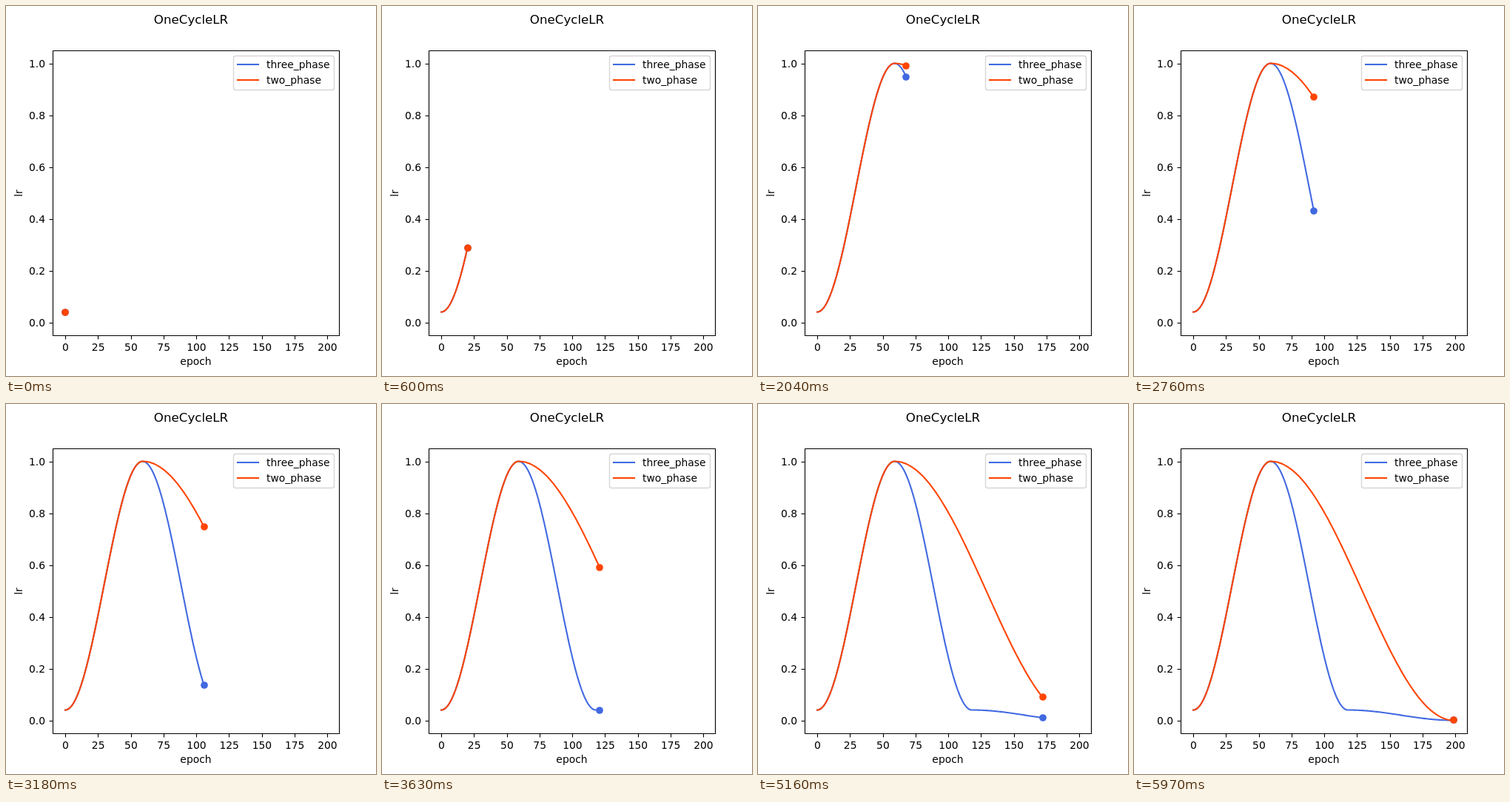
Recreate the animation shown at these times as an HTML page with a canvas. Size 500 px wide and 500 px high, loop 6000 ms.

```html
<!DOCTYPE html>
<html lang="en">
<head>
<meta charset="utf-8">
<title>Learning rate schedule</title>
<style>
  html, body { margin: 0; width: 100%; height: 100%; overflow: hidden; background: #fff; }
  canvas { display: block; }
</style>
</head>
<body>
<canvas id="chart" width="500" height="500"></canvas>
<script>
const ctx = document.getElementById('chart').getContext('2d');
const EPOCHS = 200, STEP_MS = 30;
const LEFT = 63.5, RIGHT = 450.5, TOP = 60.5, BOTTOM = 445.5;
const START_LR = 0.04, END_LR = 4e-6, PEAK = 59;
const FONT = '"DejaVu Sans", Verdana, sans-serif';

const px = epoch => 62.5 + (epoch + 9.95) * 387.5 / 218.9;
const py = lr => 427.5 - 350 * lr;
const snap = v => Math.floor(v + 0.5);

// Cosine annealing from lr a to lr b
const anneal = (a, b, p) => b + (a - b) * (1 + Math.cos(Math.PI * p)) / 2;

// Phases: [last epoch, lr reached there]
const schedule = phases => epoch => {
  let from = 0, lr = START_LR;
  for (const [to, target] of phases) {
    if (epoch <= to) return anneal(lr, target, (epoch - from) / (to - from));
    from = to;
    lr = target;
  }
  return lr;
};

const series = [
  { name: 'three_phase', color: '#4169e1', legendY: 79,
    lr: schedule([[PEAK, 1], [2 * PEAK, START_LR], [EPOCHS - 1, END_LR]]) },
  { name: 'two_phase', color: '#ff4500', legendY: 100,
    lr: schedule([[PEAK, 1], [EPOCHS - 1, END_LR]]) }
];

function text(str, x, y, align = 'center', size = 10) {
  ctx.font = `${size * 100 / 72}px ${FONT}`;
  ctx.textAlign = align;
  ctx.fillStyle = '#000';
  ctx.fillText(str, x, y);
}

function line(points, color, width) {
  ctx.beginPath();
  points.forEach(([x, y]) => ctx.lineTo(x, y));
  ctx.strokeStyle = color;
  ctx.lineWidth = width;
  ctx.stroke();
}

function drawAxes() {
  for (let epoch = 0; epoch <= 200; epoch += 25) {
    const x = snap(px(epoch)) + 0.5;
    ctx.lineCap = 'butt';
    line([[x, BOTTOM], [x, BOTTOM + 5]], '#000', 1.11);
    text(epoch, px(epoch) + 0.3, 466);
  }
  for (let i = 0; i <= 5; i++) {
    const y = snap(py(i / 5)) + 0.5;
    line([[LEFT, y], [LEFT - 5, y]], '#000', 1.11);
    text((i / 5).toFixed(1), 53, y + 4.5, 'right');
  }
  ctx.strokeRect(LEFT, TOP, RIGHT - LEFT, BOTTOM - TOP);
  text('OneCycleLR', 250, 24, 'center', 12);
  text('epoch', 256.5, 485);
  ctx.save();
  ctx.translate(22, 253);
  ctx.rotate(-Math.PI / 2);
  text('lr', 0, 0);
  ctx.restore();
}

function drawLegend() {
  ctx.beginPath();
  ctx.roundRect(307.5, 67.5, 136, 46, 2.8);
  ctx.fillStyle = '#fff';
  ctx.fill();
  ctx.strokeStyle = '#d6d6d6';
  ctx.lineWidth = 1.39;
  ctx.stroke();
  for (const s of series) {
    line([[313, s.legendY], [341, s.legendY]], s.color, 2.08);
    text(s.name, 352, s.legendY + 5, 'left');
  }
}

function draw(epoch) {
  ctx.fillStyle = '#fff';
  ctx.fillRect(0, 0, 500, 500);
  ctx.lineJoin = 'round';
  ctx.lineCap = 'square';
  if (epoch > 0) {
    for (const s of series) {
      const points = Array.from({ length: epoch + 1 }, (_, i) => [px(i), py(s.lr(i))]);
      line(points, s.color, 2.08);
    }
  }
  for (const s of series) {
    ctx.beginPath();
    ctx.arc(snap(px(epoch)), snap(py(s.lr(epoch))), 4.86, 0, 2 * Math.PI);
    ctx.fillStyle = s.color;
    ctx.fill();
  }
  drawAxes();
  ctx.lineCap = 'square';
  drawLegend();
}

const start = performance.now();
function tick() {
  draw(Math.floor((performance.now() - start) / STEP_MS) % EPOCHS);
  requestAnimationFrame(tick);
}
tick();
</script>
</body>
</html>
```
